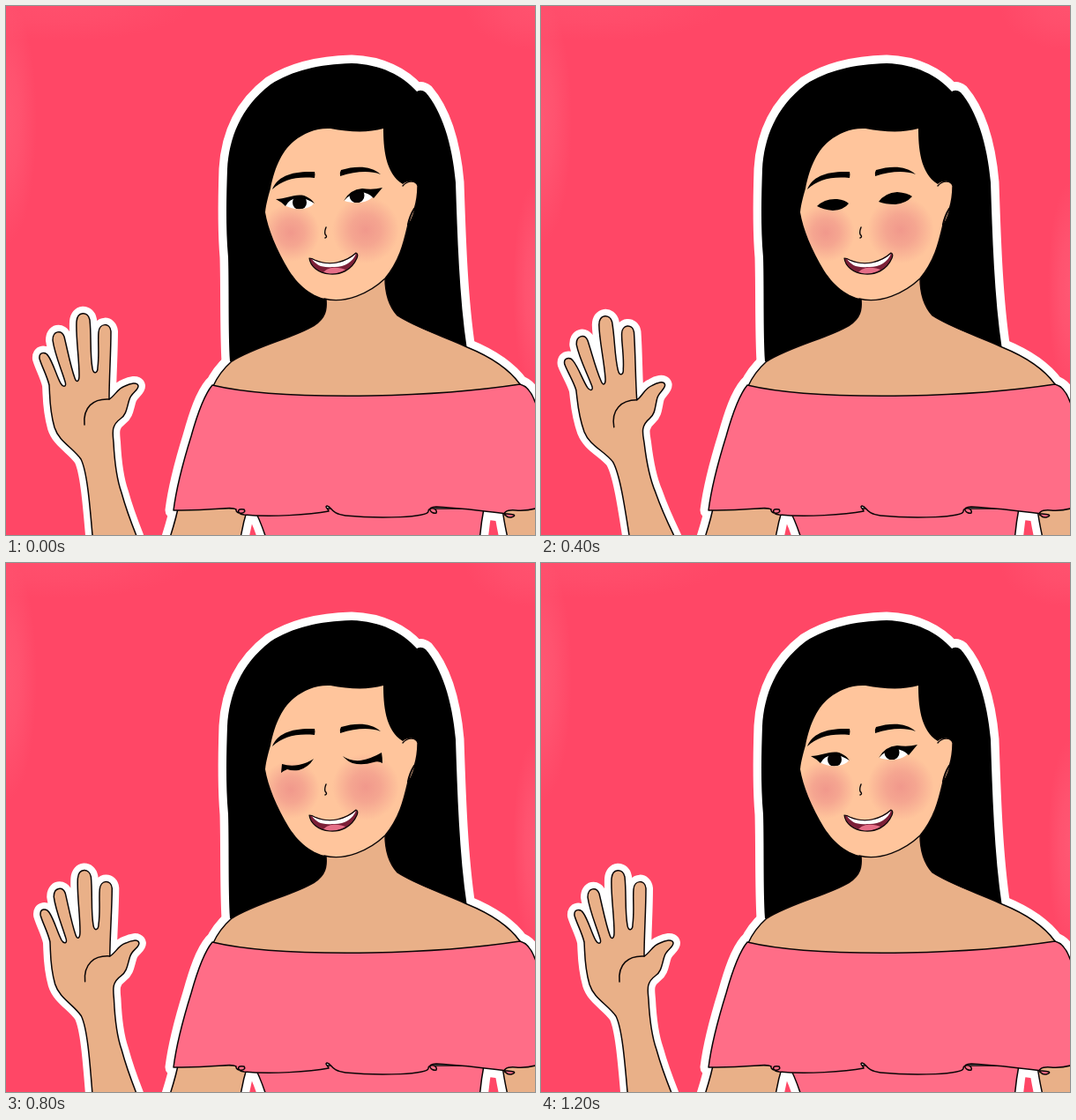
Animation of 600x600 px, one loop 1.28 s. Source, as an HTML page with a canvas:

```html
<!DOCTYPE html>
<html lang="en">
<head>
<meta charset="utf-8">
<title>Waving hello</title>
<style>
html, body { margin: 0; width: 100%; height: 100%; overflow: hidden; background: #ff4766; }
canvas { display: block; width: 100vw; height: 100vh; }
</style>
</head>
<body>
<canvas id="stage" width="600" height="600"></canvas>
<script>
const ctx = document.getElementById('stage').getContext('2d');
const LOOP = 1280;
const SKIN = '#e9b088', FACE = '#ffc59c', DRESS = '#ff6d87', INK = '#0a0506';
const path = d => new Path2D(d);

const hair = path('M254 403C252 370 253 320 252 285C249 250 250 215 251 185C253 150 266 115 300 89C325 73 355 66 392 65C425 66 450 79 466 97Q471 94 476 98C494 119 506 155 510 200C512 260 514 330 523 390L440 420L300 420Z');
const shoulders = path('M430 308C430 325 434 340 444 351C465 365 500 376 523 387C550 398 570 411 583 429L583 450L234 450L235 431C240 420 247 411 256 403C285 385 325 377 350 362C362 354 364 345 363 331Z');
const neckLine = path('M363 333C364 345 362 354 350 362C325 377 285 385 256 403C247 411 240 420 235 431M430 308C430 325 434 340 444 351C465 365 500 376 523 387C550 398 570 411 583 429');
const face = path('M300 207C304 187 311 166 327 153C338 144 352 138 368 139C390 143 410 144 428 139C428 160 430 190 450 202C456 197 465 198 467 204C467 217 464 235 456 248C451 270 446 290 430 309C412 326 394 334 373 334C350 332 334 320 321 300C307 277 297 252 294 234C295 224 298 214 300 207Z');
const faceLines = path('M361 332C385 338 412 326 430 309C446 290 451 270 456 248M450 204C456 197 465 198 467 204Q467 218 463 231M363 251Q361 256 362 259Q365 262 362 263');
const earLine = path('M463 230Q458 238 456 248');
const brows = path('M302 208C308 193 324 187 350 188Q351 191 350 195C329 193 314 197 302 208ZM379 193Q378 189 380 186C397 181 414 181 425 191C411 186 396 188 379 193Z');

const mouth = path('M344 286Q347 286 350 288C368 296 386 290 397 280Q400 281 398 286C392 300 379 305 367 304C354 303 345 295 344 286Z');
const teeth = path('M347 287C365 297 386 291 397 281C393 291 383 297 370 296C358 297 352 294 347 287Z');
const tongue = path('M360 302C367 294 380 297 385 299Q377 304 367 304Z');

const cape = path('M234 430C280 441 350 443 415 442C470 441 530 437 583 429Q594 432 600 449L615 480L615 563C604 571 592 573 578 572C566 571 563 576 567 578C570 582 579 579 576 577C560 575 525 570 488 568C475 568 483 577 488 575C490 569 479 568 479 573C480 580 425 582 385 578C368 576 370 568 364 567C361 568 366 571 366 573C345 577 300 580 270 577C262 576 261 569 270 571C274 576 260 577 261 571C254 567 238 573 190 572C193 548 201 517 210 488C217 463 224 442 234 430Z');
const torso = path('M281 570Q289 584 297 610L537 610Q538 591 542 570Z');
const leftArm = path('M196 565Q193 582 183 612L265 612Q267 592 274 570Z');
const rightArm = path('M563 570Q565 587 571 612L620 612L620 565Z');

const hand = path('M106 640L98 600C95 565 92 528 85 514C76 501 60 494 55 478C49 457 50 444 49 430C46 418 41 410 38 400C37 392 45 392 48 397C54 406 57 419 62 428C65 433 69 432 67 426C62 410 55 394 53 379C53 368 63 367 66 375C70 391 73 408 78 422C80 428 83 426 83 419C83 399 79 375 80 358C81 346 93 346 95 356C97 375 95 394 98 411C99 418 104 417 104 410C106 395 104 380 105 370C106 359 118 359 119 369C119 395 117 420 117 446C124 442 126 434 135 431C141 428 149 426 150 431C150 436 142 439 140 446C137 455 137 463 130 468C119 476 121 484 122 495C123 515 125 535 131 552C136 570 142 586 148 601L162 640Z');
const crease = path('M117 446C99 445 87 455 89 475');

// Each pose: eye whites, lids, then the irises as [x, y, r].
const eyes = {
  o: {
    white: path('M312 222C322 214 340 214 349 224C345 231 322 234 312 222ZM384 221C392 208 410 207 419 212C414 224 396 225 384 221Z'),
    lid: path('M306 219C318 219 326 213 338 215Q346 218 350 224Q340 217 330 218Q321 219 317 227Q312 222 306 219ZM383 221Q390 208 404 207Q416 209 427 206Q422 212 417 218Q412 212 402 211Q391 212 383 221Z'),
    iris: [[333, 223, 8], [398, 215, 8.5]]
  },
  h: {
    white: path('M316 225C325 217 340 216 349 222C346 231 325 234 316 225ZM383 219C392 212 408 210 417 214C415 224 396 225 383 219Z'),
    lid: path('M310 224Q318 220 327 216Q340 214 350 222Q340 218 330 219Q322 221 317 226Q313 224 310 224ZM382 219Q390 210 402 208Q414 210 424 210Q420 213 416 216Q408 212 400 213Q390 214 382 219Z'),
    iris: [[335, 224, 8], [398, 216, 8.5]]
  },
  d: {
    lid: path('M313 227Q322 218 336 219Q345 220 349 224Q344 231 331 232Q320 231 313 227ZM383 222Q390 212 404 211Q416 212 421 216Q414 224 402 225Q390 225 383 222Z')
  },
  s: {
    white: path('M315 228Q330 221 348 224Q342 233 328 233Q320 232 315 228ZM384 221Q400 212 419 216Q414 225 400 225Q390 225 384 221Z'),
    lid: path('M314 228Q322 218 336 218Q345 219 349 223Q344 230 333 231Q320 229 314 228ZM383 221Q390 211 404 210Q416 212 421 215Q414 222 402 224Q390 223 383 221Z')
  },
  c: {
    lid: path('M313 228Q322 231 332 229Q342 227 349 222Q343 232 332 235Q324 236 319 234Q314 236 312 238ZM382 219Q390 225 402 224Q414 222 426 215Q427 221 427 227Q422 224 417 226Q404 230 393 227Q386 224 382 219Z')
  }
};
const blink = 'oohhhdddcccccsshhoo';

// Wave keys: [step, degrees]
const wave = [[0, 0], [3, -1.85], [6, -3.9], [7, -3.9], [8, -3.3], [10, -1.35], [14, 2.1], [16, 2.1], [18, 0]];

function waveAngle(step) {
  const i = Math.max(1, wave.findIndex(k => k[0] >= step));
  const [a, x] = wave[i - 1], [b, y] = wave[i];
  return (x + (y - x) * (step - a) / (b - a)) * Math.PI / 180;
}

// Steps last 80, 40, 80 ms in turn.
function stepAt(ms) {
  const r = ms % 200;
  return Math.floor(ms / 200) * 3 + (r >= 120 ? 2 : r >= 80 ? 1 : 0);
}

function fill(p, color) {
  ctx.fillStyle = color;
  ctx.fill(p);
}

function line(p, width = 1.5, color = INK) {
  ctx.lineWidth = width;
  ctx.strokeStyle = color;
  ctx.stroke(p);
}

function glow(x, y, r, rgb, alpha, sx = 1, sy = 1) {
  ctx.save();
  ctx.translate(x, y);
  ctx.scale(sx, sy);
  const g = ctx.createRadialGradient(0, 0, 0, 0, 0, r);
  g.addColorStop(0, `rgba(${rgb},${alpha})`);
  g.addColorStop(0.45, `rgba(${rgb},${alpha * 0.7})`);
  g.addColorStop(1, `rgba(${rgb},0)`);
  ctx.fillStyle = g;
  ctx.fillRect(-r, -r, 2 * r, 2 * r);
  ctx.restore();
}

function drawBackground() {
  ctx.fillStyle = '#ff4766';
  ctx.fillRect(0, 0, 600, 600);
  glow(0, 130, 100, '255,125,145', 0.3, 0.35, 1.4);
  glow(60, 0, 100, '255,125,145', 0.15, 1.5, 0.4);
  glow(600, 320, 100, '255,125,145', 0.3, 0.25, 1.2);
  glow(600, 0, 100, '255,125,145', 0.2, 0.8, 0.5);
}

function drawBody() {
  for (const p of [hair, shoulders, cape, torso, leftArm, rightArm]) line(p, 19, '#fff');
  fill(hair, '#000');
  for (const p of [leftArm, rightArm]) { fill(p, SKIN); line(p); }
  fill(torso, DRESS);
  line(torso);
  fill(shoulders, SKIN);
  line(neckLine);
  fill(cape, DRESS);
  line(cape);
}

function drawFace() {
  fill(face, FACE);
  ctx.save();
  ctx.clip(face);
  glow(323, 257, 33, '232,125,130', 0.62);
  glow(408, 254, 38, '232,125,130', 0.62);
  ctx.restore();
  line(faceLines, 1.4);
  line(earLine, 2.2);
  fill(brows, '#000');
  fill(mouth, '#7c2038');
  fill(tongue, '#e66f88');
  fill(teeth, '#fff');
  line(mouth, 1.2);
}

function drawEyes({ white, lid, iris = [] }) {
  if (white) {
    fill(white, '#fff');
    ctx.save();
    ctx.clip(white);
    for (const [x, y, r] of iris) {
      const disc = new Path2D();
      disc.arc(x, y, r, 0, 2 * Math.PI);
      fill(disc, '#050303');
    }
    ctx.restore();
  }
  fill(lid, '#000');
}

function drawHand(angle) {
  ctx.save();
  ctx.translate(125, 568);
  ctx.rotate(angle);
  ctx.translate(-125, -568);
  line(hand, 16, '#fff');
  fill(hand, SKIN);
  line(hand);
  line(crease);
  ctx.restore();
}

function draw(ms) {
  const step = stepAt(ms);
  drawBackground();
  drawBody();
  drawFace();
  drawEyes(eyes[blink[step]]);
  drawHand(waveAngle(step));
}

ctx.lineJoin = ctx.lineCap = 'round';
const start = performance.now();
function tick() {
  draw((performance.now() - start) % LOOP);
  requestAnimationFrame(tick);
}
tick();
</script>
</body>
</html>
```
